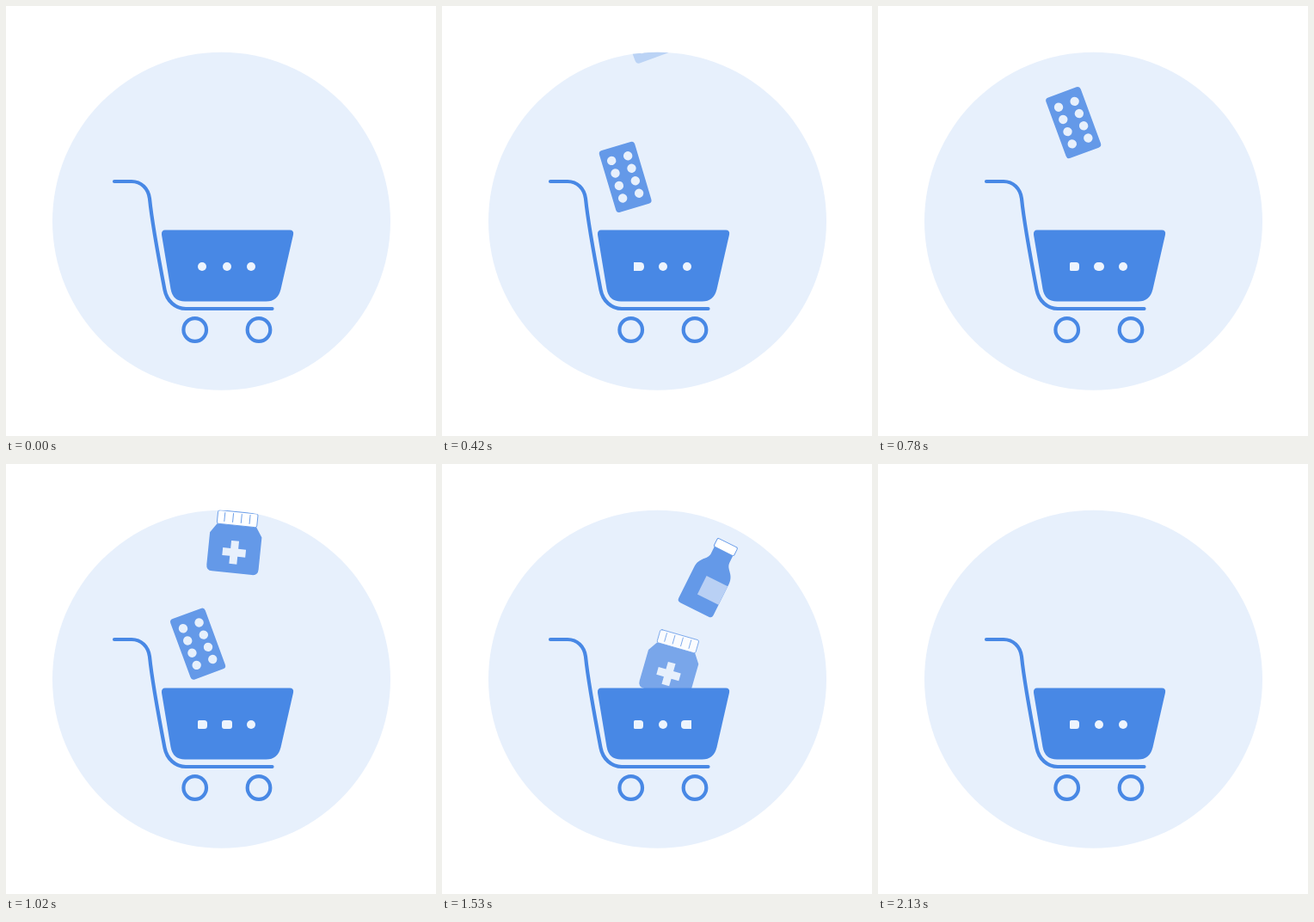
An HTML page with a canvas for the animation above (2630 ms loop, 500x500 px).

```html
<!DOCTYPE html>
<html lang="en">
<head>
<meta charset="utf-8">
<title>Pharmacy cart</title>
<style>
  html, body { margin: 0; width: 100%; height: 100%; overflow: hidden; background: #fff; }
  canvas { display: block; width: 100vw; height: 100vh; }
</style>
</head>
<body>
<canvas id="stage" width="500" height="500"></canvas>
<script>
const ctx = document.getElementById('stage').getContext('2d');
const LOOP = 2630, STEP = 30, LAST = 2130;
const BLUE = '#4888e5', SOFT = '#6499e8', PALE = '#e7f0fc', DOT = '#edf4fd', LABEL = '#b9d0f4';

const handle = new Path2D('M126 204H146C157 204 165.5 212 167 224C170 254 178 296 184.5 330C187 343 197 352 209 352H309.5');
const basket = new Path2D('M185 260.5H330Q335 260.5 334 266L319.5 329.5Q316 343.5 302.5 343.5H208Q194 343.5 191.5 329L181 266Q180.5 260.5 185 260.5Z');
const jarBody = new Path2D('M-23 -31.5H23L30.3 -20.5V17Q30.3 24 23.3 24H-23.3Q-30.3 24 -30.3 17V-20.5Z' +
  'M-4.5 -13.5H4.5V-4.5H13.5V4.5H4.5V13.5H-4.5V4.5H-13.5V-4.5H-4.5Z');
const bottleBody = new Path2D('M-12 -32.5H12V-24C12 -15 22.5 -14 22.5 -1V39.5Q22.5 43.5 18.5 43.5H-18.5Q-22.5 43.5 -22.5 39.5V-1C-22.5 -14 -12 -15 -12 -24Z');

const pillPack = new Path2D();
pillPack.roundRect(-21.5, -37.5, 43, 75, 4);
for (let row = 0; row < 4; row++) {
  for (const x of [-9.9, 9.9]) {
    const y = (row - 1.5) * 15.15;
    pillPack.moveTo(x + 5.2, y);
    pillPack.arc(x, y, 5.2, 0, Math.PI * 2);
  }
}

function fillPath(path, color) {
  ctx.fillStyle = color;
  ctx.fill(path, 'evenodd');
}

function disc(x, y, r) {
  ctx.beginPath();
  ctx.arc(x, y, r, 0, Math.PI * 2);
}

function cap(x, y, w, h) {
  ctx.beginPath();
  ctx.roundRect(x, y, w, h, 2);
  ctx.fillStyle = '#fff';
  ctx.fill();
  ctx.strokeStyle = SOFT;
  ctx.lineWidth = 0.9;
  ctx.stroke();
}

function drawPills() {
  fillPath(pillPack, SOFT);
}

function drawJar() {
  fillPath(jarBody, SOFT);
  cap(-23.3, -47.3, 46.6, 15.8);
  ctx.beginPath();
  for (let i = 0; i < 4; i++) {
    const x = -15 + i * 9.8;
    ctx.moveTo(x, -45);
    ctx.lineTo(x, -35);
  }
  ctx.stroke();
}

function drawBottle() {
  fillPath(bottleBody, SOFT);
  ctx.fillStyle = LABEL;
  ctx.fillRect(-5, 2, 27.5, 24);
  cap(-13, -43.3, 26, 10.8);
}

// Position and angle at time `at`, velocities per ms, fade-in and fade-out spans
const items = [
  { draw: drawPills, at: 240, x: 211, y: 121, vx: 0.012, vy: 0.4325, deg: -16.6, spin: 0, in: [0, 300], out: [560, 750] },
  { draw: drawPills, at: 780, x: 227.2, y: 135.6, vx: -0.017, vy: 0.3065, deg: -20.2, spin: 0, in: [360, 540], out: [1050, 1350] },
  { draw: drawJar, at: 1230, x: 264.5, y: 161, vx: -0.0033, vy: 0.277, deg: 10, spin: 0.02, in: [820, 1000], out: [1470, 1830] },
  { draw: drawBottle, at: 1530, x: 313, y: 130.5, vx: -0.033, vy: 0.256, deg: 26.5, spin: 0, in: [1260, 1420], out: [1800, 2130] }
];

const ramp = (t, [a, b]) => Math.min(1, Math.max(0, (t - a) / (b - a)));

function drawItem(item, t) {
  const alpha = ramp(t, item.in) * (1 - ramp(t, item.out));
  if (alpha <= 0) return;
  const dt = t - item.at;
  ctx.save();
  ctx.globalAlpha = alpha;
  ctx.translate(item.x + item.vx * dt, item.y + item.vy * dt);
  ctx.rotate((item.deg + item.spin * dt) * Math.PI / 180);
  item.draw();
  ctx.restore();
}

// Each row: start time, left, right, left radius, right radius
const dots = [
  [[0, 223, 233, 5, 5], [90, 223, 236, 0, 3], [420, 223, 235, 0, 4.5], [660, 223, 234, 1.5, 3.5]],
  [[0, 252, 262, 5, 5], [660, 251, 263, 5, 5], [1020, 251, 263, 3, 3], [1380, 252, 262, 5, 5]],
  [[0, 280, 290, 5, 5], [1380, 278, 290, 4, 0], [1830, 280, 290, 5, 5]]
];

function drawDot(states, t) {
  const [, left, right, rl, rr] = states.filter(s => s[0] <= t).pop();
  ctx.beginPath();
  ctx.roundRect(left, 298, right - left, 10, [rl, rr, rr, rl]);
  ctx.fillStyle = DOT;
  ctx.fill();
}

function drawCart(t) {
  ctx.strokeStyle = BLUE;
  ctx.lineWidth = 4.2;
  ctx.lineCap = 'round';
  ctx.stroke(handle);
  for (const x of [219.7, 294]) {
    disc(x, 376.5, 13.3);
    ctx.stroke();
  }
  fillPath(basket, BLUE);
  dots.forEach(states => drawDot(states, t));
}

function render(t) {
  ctx.fillStyle = '#fff';
  ctx.fillRect(0, 0, 500, 500);
  ctx.save();
  disc(250.5, 250.3, 196.5);
  ctx.fillStyle = PALE;
  ctx.fill();
  ctx.clip();
  items.forEach(item => drawItem(item, t));
  ctx.restore();
  drawCart(t);
}

const start = performance.now();
function tick() {
  const t = (performance.now() - start) % LOOP;
  render(Math.min(LAST, Math.floor(t / STEP) * STEP));
  requestAnimationFrame(tick);
}
tick();
</script>
</body>
</html>
```
